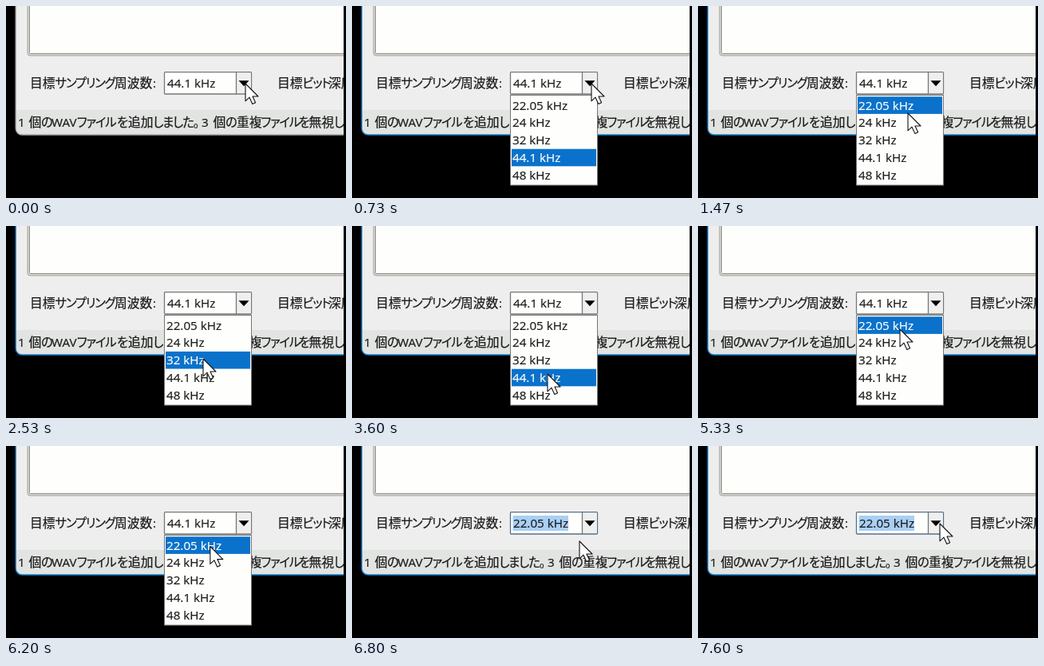
Recreate the animation shown at these times as an HTML page. Size 426 by 240 pixels, loop 8 s.

```html
<!DOCTYPE html>
<html lang="ja">
<head>
<meta charset="utf-8">
<title>Sampling rate combo box</title>
<style>
  html, body { margin: 0; width: 100%; height: 100%; overflow: hidden; background: #000; }
  svg { display: block; width: 100%; height: 100%; }
  text { color: #1c1c1c; fill: currentColor; stroke: currentColor; stroke-width: .22px; white-space: pre; }
  .latin { font: 15.2px "Open Sans", "Noto Sans", sans-serif; }
  .kanji { font: 15.8px "Noto Sans CJK JP", "Noto Sans CJK", sans-serif; }
  .kana {
    font: 15.4px "Noto Sans CJK JP", "Noto Sans CJK", sans-serif;
    font-feature-settings: "palt"; letter-spacing: -1.2px;
  }
</style>
</head>
<body>
<svg viewBox="0 0 426 240">
  <rect width="426" height="240"/>
  <clipPath id="screen"><rect width="423" height="240"/></clipPath>
  <clipPath id="body"><rect x="12" y="-20" width="440" height="181" rx="8"/></clipPath>
  <g clip-path="url(#screen)">
    <g clip-path="url(#body)">
      <rect width="426" height="162" fill="#eee"/>
      <rect y="130" width="426" height="32" fill="#e2e4e2"/>
    </g>
    <rect id="frame" x="12.2" y="-20" width="440" height="181" rx="8" fill="none" stroke-width="1.4"/>
    <rect x="27" y="-10" width="430" height="72" rx="3" fill="#d4d4ce" stroke="#a6a6a0"/>
    <rect x="29.5" y="-10" width="430" height="69.5" rx="1" fill="#fefefc" stroke="#90908a"/>
    <g id="labels"></g>

    <rect id="box" x="198.5" y="82.7" width="109" height="27.3" rx="1" fill="#fefefc" stroke-width="1.3"/>
    <rect x="289" y="84" width="18" height="25" fill="#efefef"/>
    <path d="M288.5 83V110" stroke="#777" stroke-width="1.3"/>
    <path d="M291.5 93.3H304.5L298 100.3Z"/>
    <rect id="picked" x="201.5" y="87" width="69.5" height="19" fill="#a9cff5"/>
    <text id="value" class="latin" x="202" y="102"></text>

    <g id="list">
      <rect x="198.5" y="111.5" width="109" height="112.5" fill="#fefefc" stroke="#777"/>
      <rect id="hover" x="200" width="106" height="21.6" fill="#0a72cb"/>
    </g>
    <path id="cursor" d="M0 0V21.8L5 17.2L8.8 25.4L12.6 23.8L9 16H16Z"
          fill="#fff" stroke="#111" stroke-width="1.1" stroke-linejoin="round"/>
  </g>
</svg>
<script>
  const $ = id => document.getElementById(id);
  const LOOP = 8000, STEP = 1000 / 15;
  const OPEN = 500, CLOSE = 6330;
  const TOP = 113.3, PITCH = 21.8;
  const rates = ['22.05 kHz', '24 kHz', '32 kHz', '44.1 kHz', '48 kHz'];

  // Pointer path: time, x, y
  const path = [
    [0, 300, 97], [1130, 300, 97], [1470, 263, 134], [1930, 253, 146],
    [2000, 253, 146], [2530, 247, 166], [2800, 246, 170], [3130, 246, 170],
    [3600, 245, 185], [4130, 245, 185], [4930, 249, 148], [5000, 249, 148],
    [5330, 253, 129], [5600, 254, 126], [6130, 254, 126], [6600, 285, 119],
    [6800, 285, 119], [7600, 303, 97], [LOOP, 303, 97]
  ];

  function addText(parent, cls, x, y, str) {
    const el = document.createElementNS('http://www.w3.org/2000/svg', 'text');
    el.setAttribute('class', cls);
    el.setAttribute('x', x);
    el.setAttribute('y', y);
    el.textContent = str;
    parent.appendChild(el);
    return el;
  }

  function addLine(y, runs) {
    for (const [x, str] of runs) {
      const cls = /[\u3000-\u30ff]/.test(str) ? 'kana' : /[\u4e00-\u9fff]/.test(str) ? 'kanji' : 'latin';
      addText($('labels'), cls, x, y, str);
    }
  }

  addLine(101.8, [
    [30, '目標'], [61.5, 'サンプリング'], [136, '周波数'], [184, ':'],
    [340, '目標'], [371.5, 'ビット'], [404, '深度']
  ]);
  addLine(151, [
    [15, '1'], [28.5, '個'], [44, 'の'], [57, 'WAV'], [89, 'ファイル'], [139, 'を'],
    [153, '追加'], [184.5, 'しました。'], [245, '3'], [259.5, '個'], [275, 'の'],
    [289, '重複'], [319.5, 'ファイル'], [366.5, 'を'], [379.5, '無視'], [411, 'し']
  ]);

  const items = rates.map((r, i) => addText($('list'), 'latin', 201, TOP + PITCH * i + 16.2, r));

  function pointer(t) {
    const i = path.findIndex(p => p[0] > t);
    const [t0, x0, y0] = path[i - 1], [t1, x1, y1] = path[i];
    const u = (t - t0) / (t1 - t0), k = u * u * (3 - 2 * u);
    return [x0 + (x1 - x0) * k, y0 + (y1 - y0) * k];
  }

  const show = (id, on) => $(id).setAttribute('visibility', on ? 'visible' : 'hidden');

  function draw(now) {
    const t = Math.floor((now % LOOP + 4) / STEP) * STEP % LOOP;
    const [x, y] = pointer(t);
    const done = t >= CLOSE;
    const row = y < 112 ? 3 : Math.max(0, Math.floor((y - TOP) / PITCH));

    $('frame').setAttribute('stroke', t < OPEN ? '#a8a8a8' : '#1584d2');
    $('box').setAttribute('stroke', done ? '#56708a' : '#777');
    $('value').textContent = rates[done ? 0 : 3];
    show('picked', done);
    show('list', t >= OPEN && !done);
    $('hover').setAttribute('y', TOP + PITCH * row);
    items.forEach((el, i) => el.style.color = i === row ? '#fff' : '');
    $('cursor').setAttribute('transform', `translate(${x} ${y})`);
  }

  const start = performance.now();
  function tick() {
    draw(performance.now() - start);
    requestAnimationFrame(tick);
  }
  tick();
</script>
</body>
</html>
```
